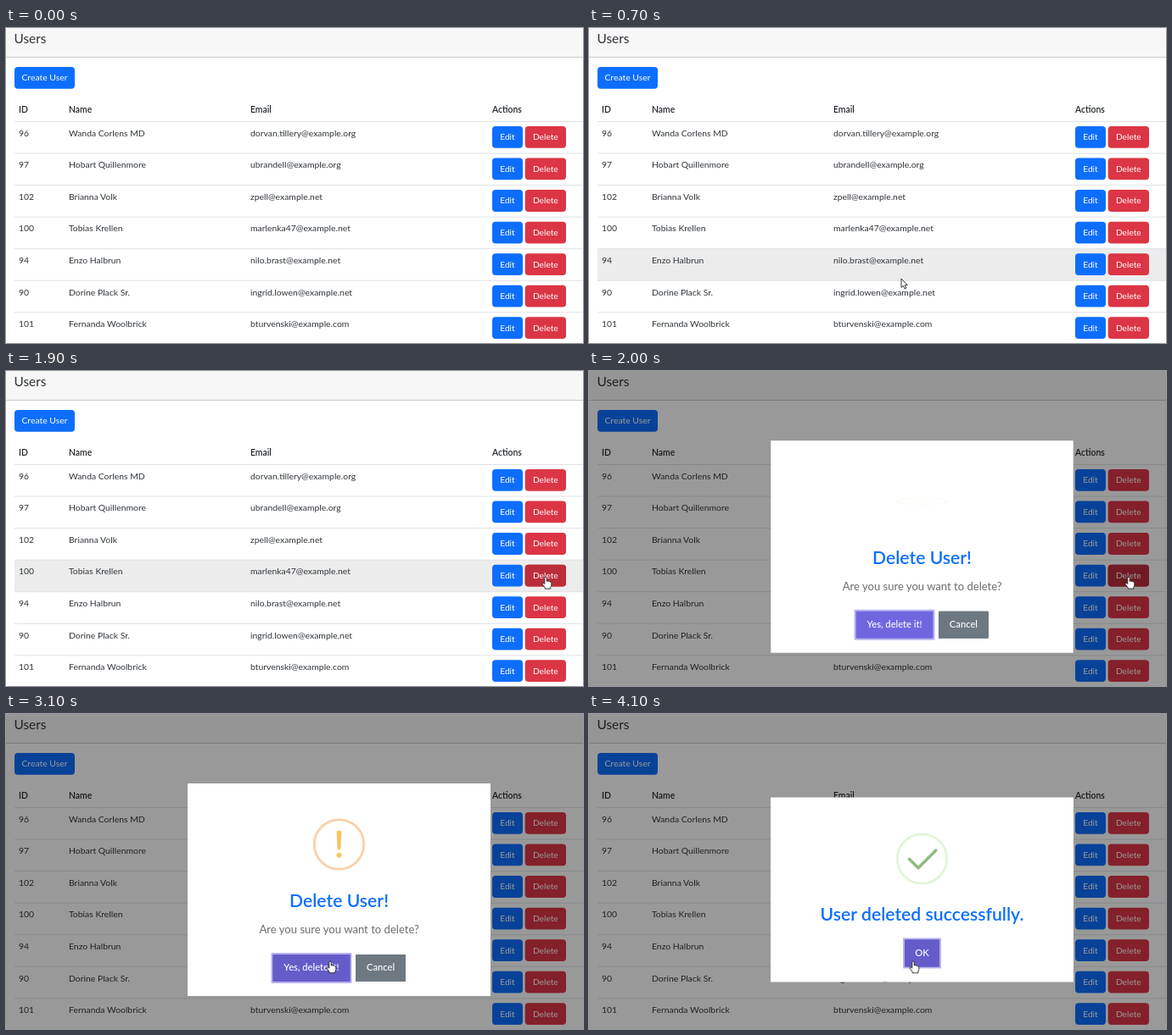
Animation of 680 by 372 pixels, one loop 4.2 s. Source, as an HTML page:

```html
<!DOCTYPE html>
<html lang="en">
<head>
<meta charset="utf-8">
<title>Users</title>
<style>
  html, body { margin: 0; width: 100%; height: 100%; overflow: hidden; background: #fff; }
  svg { display: block; width: 100vw; height: 100vh; }
  text { font-family: Lato, "Open Sans", sans-serif; font-size: 10.4px; fill: #30353a; }
  .bold { font-weight: 600; fill: #212529; }
  .btn { font-size: 10.2px; fill: #fff; text-anchor: middle; }
  .mid { text-anchor: middle; }
  .title { font-size: 21.2px; font-weight: 600; fill: #0d6efd; text-anchor: middle; }
  .action { font-size: 11.2px; font-weight: 500; fill: #fff; text-anchor: middle; }
</style>
</head>
<body>
<svg id="stage" viewBox="0 0 680 372"></svg>
<script>
const LOOP = 4200, TICK = 100;
const ENTER_AT = 500, ASK_AT = 1925, DONE_AT = 3300;
const ROW_TOP = 110.5, ROW_H = 37.55, EM = 11.1;
const BLUE = '#0d6efd', BLUE_HOVER = '#0b5ed7', RED = '#dc3545', RED_HOVER = '#bb2d3b';
const VIOLET = '#7066e0', VIOLET_HOVER = '#655cca';

const users = [
  [96, 'Wanda Corlens MD', 'dorvan.tillery@example.org'],
  [97, 'Hobart Quillenmore', 'ubrandell@example.org'],
  [102, 'Brianna Volk', 'zpell@example.net'],
  [100, 'Tobias Krellen', 'marlenka47@example.net'],
  [94, 'Enzo Halbrun', 'nilo.brast@example.net'],
  [90, 'Dorine Plack Sr.', 'ingrid.lowen@example.net'],
  [101, 'Fernanda Woolbrick', 'bturvenski@example.com']
];

const stage = document.getElementById('stage');

function el(parent, tag, attrs = {}) {
  const node = document.createElementNS('http://www.w3.org/2000/svg', tag);
  parent.appendChild(node);
  return set(node, attrs);
}
function set(node, attrs) {
  for (const k in attrs) node.setAttribute(k, attrs[k]);
  return node;
}
const show = (node, on) => set(node, { display: on ? 'inline' : 'none' });
const group = (parent, attrs) => el(parent, 'g', attrs);
const rect = (parent, x, y, width, height, fill, rx = 0) =>
  el(parent, 'rect', { x, y, width, height, fill, rx });
function text(parent, x, y, str, cls = '', attrs = {}) {
  const node = el(parent, 'text', { x, y, class: cls, ...attrs });
  node.textContent = str;
  return node;
}

// A button has a second face that fades in under the pointer.
function button(parent, [x, y, w, h], label, cls, fill, hover, rx, dy) {
  rect(parent, x, y, w, h, fill, rx);
  const face = rect(parent, x, y, w, h, hover, rx);
  text(parent, x + w / 2, y + dy, label, cls);
  return { face, x, y, w, h };
}
const tableButton = (x, y, w, label, fill, hover) =>
  button(stage, [x, y, w, 25.8], label, 'btn', fill, hover, 4, 16.3);
const dialogButton = (parent, x, y, w, label, fill, hover) =>
  button(parent, [x, y, w, 32], label, 'action', fill, hover, 1, 19);
const focusRing = (parent, x, y, w) => rect(parent, x - 2, y - 2, w + 4, 36, '#b7b2ef', 1);

// Page
rect(stage, 0, 0, 680, 372, '#fff');
rect(stage, 0, 0, 680, 34, '#f7f7f7');
rect(stage, 0, 34, 680, 1, '#cdcdcd');
text(stage, 9.5, 18, 'Users', '', { style: 'font-size:15.4px' });
rect(stage, 10, 46, 71, 25.7, BLUE, 4);
text(stage, 45.5, 62.3, 'Create User', 'btn', { style: 'font-size:10.4px' });
[[15, 'ID'], [74, 'Name'], [288, 'Email'], [573, 'Actions']]
  .forEach(([x, label]) => text(stage, x, 100, label, 'bold'));

const rows = users.map(([id, name, mail], i) => {
  const top = ROW_TOP + i * ROW_H;
  const bg = rect(stage, 10, top, 670, ROW_H, '#ececec');
  rect(stage, 10, top - 0.5, 670, 1, '#dee2e6');
  text(stage, 15, top + 17.3, id);
  text(stage, 74, top + 17.3, name);
  text(stage, 288, top + 17.3, mail);
  const buttons = [
    tableButton(573, top + 5.5, 36, 'Edit', BLUE, BLUE_HOVER),
    tableButton(611.7, top + 5.5, 48.3, 'Delete', RED, RED_HOVER)
  ];
  return { top, bg, buttons };
});
const rowButtons = rows.flatMap(r => r.buttons);

const shade = rect(stage, 0, 0, 680, 372, 'rgba(0,0,0,.4)');

// Confirmation dialog
const ask = group(stage);
rect(ask, 214, 82, 357, 251, '#fff');
const warn = group(ask);
el(warn, 'circle', { r: 29.2, fill: 'none', stroke: '#f9d0ab', 'stroke-width': 2.8 });
const mark = group(warn, { fill: '#f5c663' });
el(mark, 'path', { d: 'M-2.9-14.2Q-2.9-16.4 0-16.4Q2.9-16.4 2.9-14.2L1.9 5Q1.7 6.6 0 6.6Q-1.7 6.6-1.9 5Z' });
el(mark, 'circle', { cy: 12.7, r: 3 });
text(ask, 392.5, 228, 'Delete User!', 'title');
text(ask, 392.7, 259, 'Are you sure you want to delete?', 'mid', { style: 'font-size:13.1px;fill:#6c6c6c' });
focusRing(ask, 314.5, 284, 91);
const yes = dialogButton(ask, 314.5, 284, 91, 'Yes, delete it!', VIOLET, VIOLET_HOVER);
dialogButton(ask, 412, 284, 59, 'Cancel', '#6e7881', '#6e7881');

// Success dialog
const done = group(stage);
rect(done, 214, 98.5, 357, 218, '#fff');
const tick = group(done, { transform: 'translate(392.5 171)' });
const arc = el(tick, 'path', { fill: 'none', stroke: '#9ccb86', 'stroke-width': 2.8 });
el(tick, 'circle', { r: 29.2, fill: 'none', stroke: '#a5dc86', 'stroke-opacity': 0.32, 'stroke-width': 2.8 });
const bars = [0, 1].map(() => rect(tick, 0, 0, 0, 3.5, '#8fba80', 1.6));
text(done, 392.5, 244, 'User deleted successfully.', 'title');
focusRing(done, 372, 266.5, 41);
const ok = dialogButton(done, 372, 266.5, 41, 'OK', VIOLET, VIOLET_HOVER);

// Pointer
const pen = { fill: '#fff', stroke: '#222', 'stroke-width': 0.9, 'stroke-linejoin': 'round' };
const arrow = el(stage, 'path', { ...pen, d: 'M0 0V10.5L2.4 8.3L4 12L5.8 11.2L4.2 7.7H7.4Z' });
const hand = el(stage, 'path', { ...pen,
  d: 'M-1.2 1.2Q-1.2 0 0 0Q1.2 0 1.2 1.2V5Q2.4 4.3 3.3 5.2Q4.6 4.7 5.2 5.8Q6.8 5.6 6.8 7.2V9.5' +
     'Q6.8 11 5.8 12V13.8H-.8V12.6L-3.8 8.6Q-4.4 7.2-3 7Q-2.2 7-1.2 8.2Z' });

const clamp = v => Math.min(1, Math.max(0, v));

// Same curve as CSS cubic-bezier(), solved by bisection
function bezier(x1, y1, x2, y2) {
  const at = (a, b, s) => 3 * a * s * (1 - s) ** 2 + 3 * b * s * s * (1 - s) + s ** 3;
  return p => {
    let lo = 0, hi = 1;
    for (let i = 0; i < 20; i++) {
      const s = (lo + hi) / 2;
      if (at(x1, x2, s) < p) lo = s; else hi = s;
    }
    return at(y1, y2, hi);
  };
}
const linear = p => p;
const ease = bezier(0.25, 0.1, 0.25, 1);
const easeIn = bezier(0.42, 0, 1, 1);

// Each key is [position, ...values].
function track(keys, p, curve = ease) {
  let i = 0;
  while (i < keys.length - 2 && p >= keys[i + 1][0]) i++;
  const a = keys[i], b = keys[i + 1];
  const k = curve(clamp((p - a[0]) / (b[0] - a[0])));
  return a.slice(1).map((v, j) => v + (b[j + 1] - v) * k);
}

const path = [
  [500, 328, 362], [700, 368, 296], [1400, 633, 244], [1600, 636, 243.3],
  [2100, 636, 243.3], [2700, 396, 292], [2900, 382, 292]
];
const pop = [[0, 0.7], [0.45, 1.05], [0.8, 0.95], [1, 1]];
const wobble = [[0, 45, 0], [0.25, -25, 0.4], [0.5, 15, 0.8], [0.75, -5, 1], [1, 0, 1]];
// Check strokes: left edge, top and length in em
const shortBar = [[0.54, 0.0625, 1.1875, 0], [0.7, -0.375, 2.1875, 3.125], [0.84, 1.3125, 3, 1.0625], [1, 0.8125, 2.8125, 1.5625]];
const longBar = [[0.65, 2.125, 3.375, 0], [0.84, 1.5625, 2.1875, 3.4375], [1, 1.5625, 2.375, 2.9375]];

function popIn(node, age) {
  const [s] = track(pop, age / 300);
  set(node, { transform: `translate(392.5 207.5) scale(${s}) translate(-392.5 -207.5)` });
}

function drawWarning(age) {
  const k = ease(clamp(age / 500));
  const flip = Math.cos((1 - k) * 100 * Math.PI / 180);
  set(warn, { transform: `translate(392.5 154) scale(1 ${flip})`, opacity: k });
  const [turn, alpha] = track(wobble, age / 500);
  set(mark, { transform: `rotate(${turn})`, opacity: alpha });
}

function drawSuccess(age) {
  const turn = 360 * easeIn(clamp((age - 212) / 298));
  const from = turn < 180 ? 45 - turn : -135;
  const to = turn < 180 ? 45 : 225 - turn;
  const at = deg => [Math.cos(deg * Math.PI / 180) * 29.2, Math.sin(deg * Math.PI / 180) * 29.2].join(' ');
  show(arc, to - from > 0.5);
  set(arc, { d: `M${at(from)}A29.2 29.2 0 0 1 ${at(to)}` });
  [[shortBar, 45], [longBar, -45]].forEach(([keys, deg], i) => {
    const [left, top, len] = track(keys, age / 750);
    const cx = (left + len / 2 - 2.5) * EM, cy = (top + 0.156 - 2.5) * EM;
    set(bars[i], {
      x: -len * EM / 2, y: -1.75, width: len * EM,
      transform: `translate(${cx} ${cy}) rotate(${deg})`
    });
  });
}

const pointer = t => track(path, t, linear);
function hits(b, t) {
  const [x, y] = pointer(t);
  return t >= ENTER_AT && x >= b.x && x <= b.x + b.w && y >= b.y && y <= b.y + b.h;
}

function render(time) {
  const t = Math.floor(time / TICK) * TICK;
  const asking = t > ASK_AT && t <= DONE_AT, finished = t > DONE_AT, modal = asking || finished;
  const [x, y] = pointer(t);

  rows.forEach(r => show(r.bg, t >= ENTER_AT && !modal && y >= r.top && y < r.top + ROW_H));

  // The page keeps its hover until the pointer first moves over the dialog.
  const live = !modal || t <= 2100;
  let over = false;
  const hover = (b, active, fade) => {
    const now = active && hits(b, t);
    const half = fade && !hits(b, t - TICK);
    set(b.face, { opacity: now ? (half ? 0.6 : 1) : 0 });
    over = over || now;
  };
  rowButtons.forEach(b => hover(b, live, true));
  hover(yes, asking, false);
  hover(ok, finished, false);

  show(shade, modal);
  show(ask, asking);
  show(done, finished);
  if (asking) {
    popIn(ask, t - ASK_AT);
    drawWarning(t - ASK_AT);
  }
  if (finished) {
    popIn(done, t - DONE_AT);
    drawSuccess(t - DONE_AT);
  }

  show(arrow, t >= ENTER_AT && !over);
  show(hand, t >= ENTER_AT && over);
  const place = { transform: `translate(${x} ${y})` };
  set(arrow, place);
  set(hand, place);
}

const start = performance.now();
function loop() {
  render((performance.now() - start) % LOOP);
  requestAnimationFrame(loop);
}
loop();
</script>
</body>
</html>
```
